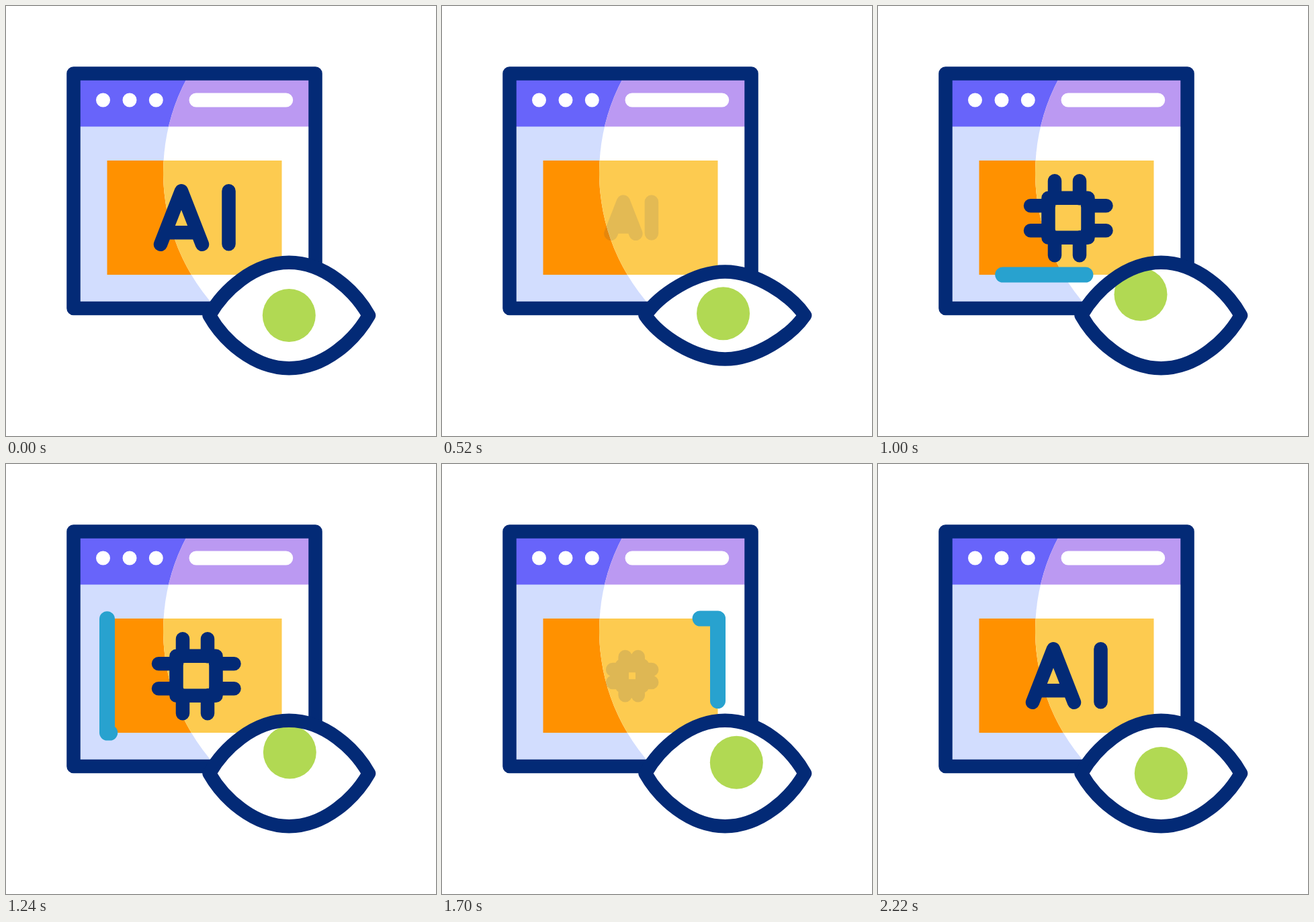
An HTML page for the animation above (2400 ms loop, 640x640 px).

```html
<!DOCTYPE html>
<html>
<head>
<meta charset="utf-8">
<style>
html, body { margin: 0; width: 100%; height: 100%; overflow: hidden; background: #fff }
svg { display: block; width: 100vw; height: 100vh }
.ink { fill: none; stroke: #032a76; stroke-width: 20.5; stroke-linecap: round; stroke-linejoin: round }
</style>
</head>
<body>
<svg viewBox="0 0 640 640">
  <clipPath id="lit"><circle cx="531" cy="248" r="297"/></clipPath>
  <!-- window: shaded side, then lit side -->
  <path fill="#d2ddfe" d="M105 105H455V445H105z"/>
  <path fill="#6864fa" d="M105 105H455V179.5H105z"/>
  <path fill="#ff9100" d="M150.5 230H410.5V400H150.5z"/>
  <g clip-path="url(#lit)">
    <path fill="#fff" d="M105 105H455V445H105z"/>
    <path fill="#bb99f2" d="M105 105H455V179.5H105z"/>
    <path fill="#fdcb50" d="M150.5 230H410.5V400H150.5z"/>
  </g>
  <path d="M144.5 140h0M184 140h0M223.3 140h0M283 140H416.7" stroke="#fff" stroke-width="21" stroke-linecap="round"/>
  <path class="ink" d="M100.5 100.5H460.5V450H100.5z"/>

  <!-- symbols, drawn around the middle of the panel -->
  <path id="letters" class="ink" d="M-53 39.5L-22 -40L9 39.5M-45 22H1M48.5 -40V39"/>
  <path id="chip" class="ink" d="M-29.5 -29.5H29.5V29.5H-29.5zM-20 -29V-55M17 -29V-55M-20 29V56M17 29V56M-29 -18H-56M-29 19H-56M29 -18H56.5M29 19H56.5"/>

  <path id="scan" d="M357 400H150.5V230H410.5V400H357" fill="none" stroke="#28a2cf" stroke-width="23" stroke-linecap="round" stroke-linejoin="round"/>

  <path id="white" fill="#fff"/>
  <circle id="pupil" r="39.5" fill="#b1d953"/>
  <path id="lids" class="ink"/>
</svg>
<script>
const el = id => document.getElementById(id);
const letters = el('letters'), chip = el('chip'), scan = el('scan');
const white = el('white'), pupil = el('pupil'), lids = el('lids');

// smooth 0 to 1 between times a and b
function ease(t, a, b) {
  const p = Math.min(1, Math.max(0, (t - a) / (b - a)));
  return p * p * (3 - 2 * p);
}

function showSymbol(node, shown, smallest) {
  const s = smallest + (1 - smallest) * shown;
  node.setAttribute('transform', `translate(283 315.3) scale(${s})`);
  node.style.strokeWidth = 20.5 / s;
  node.style.opacity = shown;
}

function drawScan(t) {
  const length = 860;
  const head = length * ease(t, 600, 2000), tail = length * ease(t, 800, 2200);
  scan.style.display = head - tail > 0.1 ? '' : 'none';
  scan.setAttribute('stroke-dasharray', `${head - tail} 2000`);
  scan.setAttribute('stroke-dashoffset', -tail);
}

function drawEye(t) {
  const squint = 21 * (ease(t, 400, 600) - ease(t, 600, 800)
    + ease(t, 1800, 2000) - ease(t, 2000, 2200));
  const cx = 421.3, cy = 460.5, h = 78.7 - squint;
  const inner = 53 - squint / 2;
  const lid = (dir, side) => {
    const top = cy - side * h, low = cy - side * h * 0.465;
    return `C${cx - dir * 98} ${low} ${cx - dir * inner} ${top} ${cx} ${top}`
      + `S${cx + dir * 98} ${low} ${cx + dir * 118.7} ${cy}`;
  };
  const d = `M${cx - 118.7} ${cy}${lid(1, 1)}${lid(-1, -1)}z`;
  white.setAttribute('d', d);
  lids.setAttribute('d', d);

  const left = ease(t, 400, 1060), across = ease(t, 1060, 1420), back = ease(t, 1420, 2000);
  pupil.setAttribute('cx', cx - 31 * left + 63.5 * across - 32.5 * back);
  pupil.setAttribute('cy', cy - 32 * left + across - 0 + 31 * back);
}

function frame(now) {
  const t = now % 2400;
  showSymbol(letters, 1 - ease(t, 200, 600) + ease(t, 1800, 2200), 0.55);
  showSymbol(chip, ease(t, 600, 1000) - ease(t, 1380, 1790), 0.45);
  drawScan(t);
  drawEye(t);
  requestAnimationFrame(frame);
}
frame(0);
</script>
</body>
</html>
```
